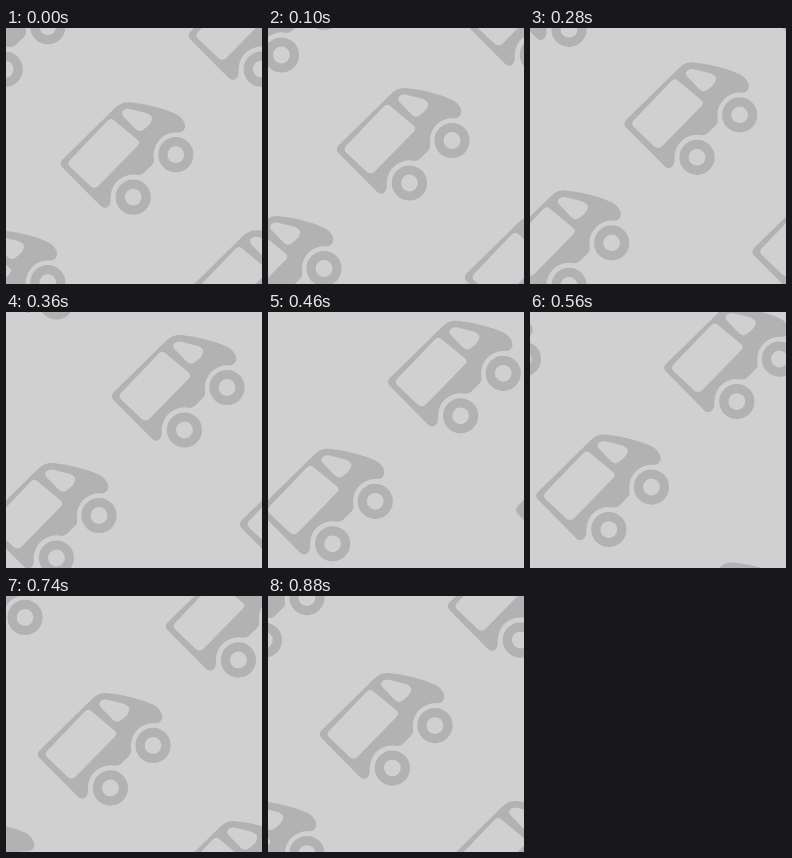
Recreate the animation shown at these times as an HTML page. Size 256x256 px, loop 0.9 s.

```html
<!DOCTYPE html>
<html lang="en">
<head>
<meta charset="utf-8">
<title>Van pattern</title>
<style>
  html, body { margin: 0; width: 100%; height: 100%; overflow: hidden; background: #d0d0d0; }
  svg { display: block; width: 100vw; height: 100vh; }
</style>
</head>
<body>
<svg viewBox="0 0 256 256">
  <defs>
    <g id="van">
      <path fill="#b2b2b2" fill-rule="evenodd" d="
        M56 132 L109.5 79.5 Q115.5 73.8 123.5 74.2 Q151 77.2 170 86 Q176 89 178.5 95
        Q180.3 100 176.5 103.2 Q174.5 104.6 171 104.4 A22.5 22.5 0 0 0 147.6 127
        Q147.7 130 148 131.5 Q148.3 134.5 146 137 L137.5 145.3 Q135.5 147.3 132 147.1
        A22.5 22.5 0 0 0 104.6 169 L104.6 174 Q104 177.8 101 179.4 Q98 180.7 95 178.3
        L56 139 Q53 135.5 56 132 Z
        M63.8 132.2 L101.5 92.8 Q104.7 89.6 108 92.3 L131.3 111.7 Q134.7 114.7 131.5 118
        L92.5 157.8 Q88.5 161.3 84.5 158.2 L64 138.7 Q60.8 135.5 63.8 132.2 Z
        M117 88 Q114.5 84 118 82 Q120.5 80.3 124 81 L140 85 Q146.5 87.3 146 91
        Q145.5 95 142 98 L137 102 Q133 104.5 129.5 101 Z"/>
      <g fill="none" stroke="#b2b2b2" stroke-width="9.2">
        <circle cx="169.8" cy="126.7" r="13"/>
        <circle cx="127.2" cy="169.2" r="13"/>
      </g>
    </g>
  </defs>
  <g id="field"></g>
</svg>
<script>
const LOOP = 900, STEP = 20, CELL = 128;
const NS = "http://www.w3.org/2000/svg";
const field = document.getElementById("field");

// Checkerboard of vans, wide enough to cover one full cell of travel.
for (let i = -3; i <= 2; i++) {
  for (let j = -2; j <= 3; j++) {
    if ((i + j) % 2) continue;
    const van = document.createElementNS(NS, "use");
    van.setAttribute("href", "#van");
    van.setAttribute("x", i * CELL);
    van.setAttribute("y", j * CELL);
    field.append(van);
  }
}

function draw(ms) {
  const t = Math.floor((ms % LOOP) / STEP) * STEP;
  const shift = CELL * t / LOOP;
  field.setAttribute("transform", `translate(${shift} ${-shift})`);
}

const start = performance.now();
function tick() {
  draw(performance.now() - start);
  requestAnimationFrame(tick);
}
draw(0);
requestAnimationFrame(tick);
</script>
</body>
</html>
```
